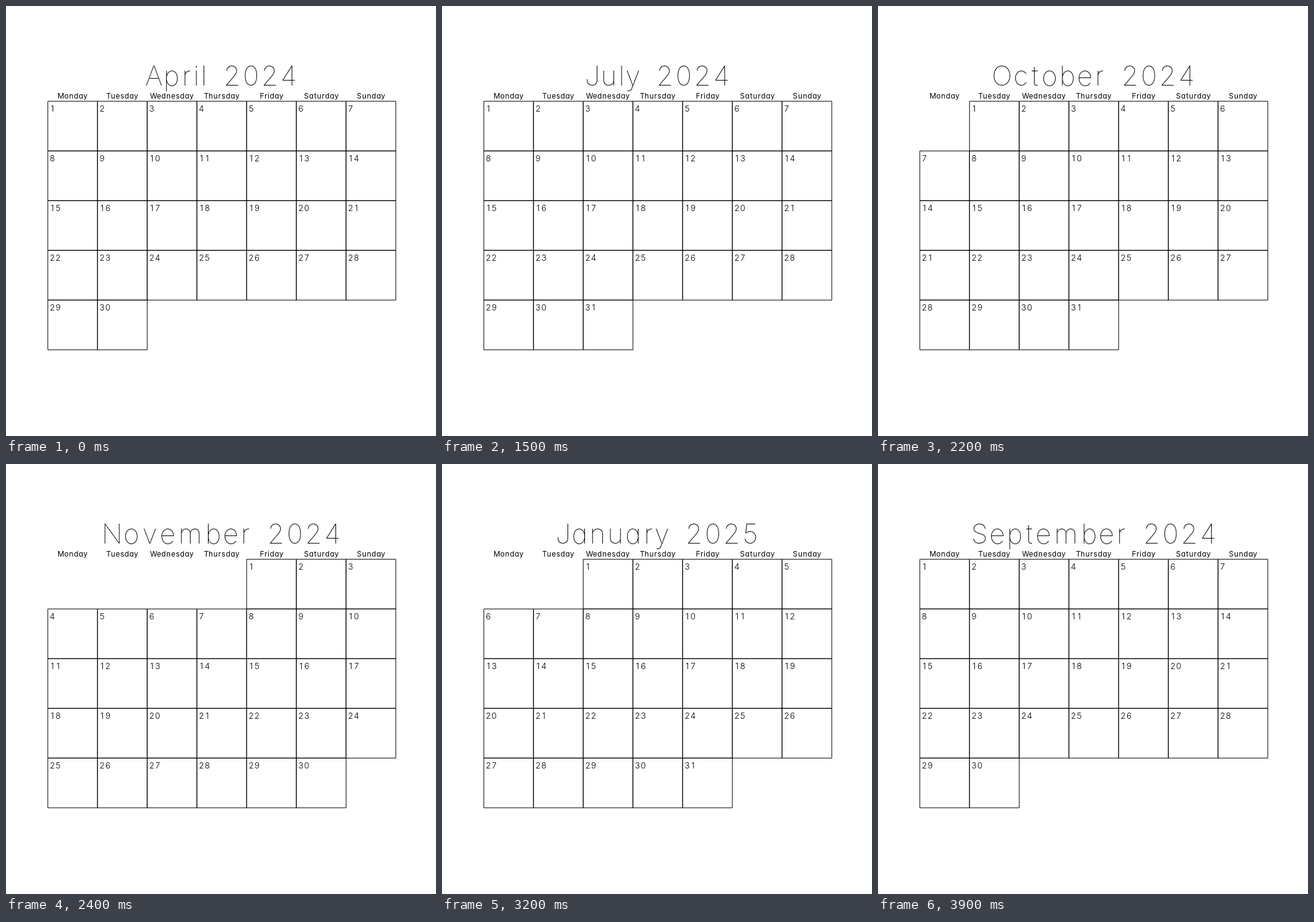
Recreate the animation shown at these times as an HTML page. Size 692 px wide and 692 px high, loop 4 s.

```html
<!DOCTYPE html>
<html lang="en">
<head>
<meta charset="utf-8">
<title>Calendar</title>
<style>
  html, body { margin: 0; width: 100%; height: 100%; overflow: hidden; background: #fff; }
  svg { display: block; width: 692px; height: 692px; }
  text {
    font-family: Inter, Lato, sans-serif; font-feature-settings: "cv11";
    font-optical-sizing: none; text-anchor: middle; fill: #000;
  }
  .title { font-size: 44px; font-weight: 100; }
  .weekday { font-size: 11.8px; }
  .day { font-size: 13.4px; font-weight: 300; }
  path { fill: none; stroke: #000; }
</style>
</head>
<body>
<svg viewBox="0 0 692 692">
  <g id="weekdays"></g>
  <g id="month"></g>
</svg>
<script>
const LEFT = 67.25, TOP = 153.25, CELL = 80, LOOP = 4000;
const WEEKDAYS = ["Monday", "Tuesday", "Wednesday", "Thursday", "Friday", "Saturday", "Sunday"];
// [start in ms, month counted from January 2024]
const STEPS = [
  [0, 3], [900, 4], [1200, 5], [1500, 6], [1800, 7], [2000, 8],
  [2200, 9], [2400, 10], [2600, 11], [2700, 12], [2900, 13],
  [3200, 12], [3400, 11], [3500, 10], [3600, 9], [3800, 8]
];
// Letters grouped by the width of their slot.
const SLOTS = {
  8: "il", 12: "t", 13: "r", 16: "JTy ", 17: "s", 18: "AFce",
  19: "abdhnopu", 20: "S", 22: "NO", 24: "MW", 30: "m"
};

function slot(ch) {
  for (const w in SLOTS) if (SLOTS[w].includes(ch)) return +w;
  return 20;
}

function textWidth(str, scale) {
  return [...str].reduce((sum, ch) => sum + slot(ch) * scale, 0);
}

function add(parent, tag, attrs, content = "") {
  const el = document.createElementNS("http://www.w3.org/2000/svg", tag);
  for (const key in attrs) el.setAttribute(key, attrs[key]);
  el.textContent = content;
  parent.append(el);
}

function addText(parent, cls, str, start, y, scale) {
  let pen = start;
  const x = [...str].map(ch => {
    const w = slot(ch) * scale;
    pen += w;
    return (pen - w / 2).toFixed(2);
  }).join(" ");
  add(parent, "text", { class: cls, x, y }, str);
}

function addCentered(parent, cls, str, mid, y, scale) {
  addText(parent, cls, str, mid - textWidth(str, scale) / 2, y, scale);
}

function drawMonth(month) {
  const group = document.getElementById("month");
  group.replaceChildren();
  const first = new Date(2024, month, 1);
  const days = new Date(2024, month + 1, 0).getDate();
  const name = first.toLocaleString("en-US", { month: "long" });
  // Months that begin on a Sunday start in the first column.
  const offset = Math.max(0, first.getDay() - 1);

  addCentered(group, "title", `${name} ${first.getFullYear()}`, LEFT + 3.5 * CELL, 127.7, 1.515);
  // One path for all cells, so that shared edges are painted once.
  let cells = "";
  for (let day = 1; day <= days; day++) {
    const i = day - 1 + offset;
    const x = LEFT + i % 7 * CELL;
    const y = TOP + Math.floor(i / 7) * CELL;
    cells += `M${x} ${y}h${CELL}v${CELL}h${-CELL}z`;
    addText(group, "day", String(day), x + 2.6, y + 16.5, 0.47);
  }
  add(group, "path", { d: cells });
}

WEEKDAYS.forEach((name, i) =>
  addCentered(document.getElementById("weekdays"), "weekday", name, LEFT + (i + 0.5) * CELL, 149.3, 0.41));

let shown = -1;
function tick() {
  const t = performance.now() % LOOP;
  const month = STEPS.filter(step => step[0] <= t).pop()[1];
  if (month !== shown) drawMonth(shown = month);
  requestAnimationFrame(tick);
}
tick();
</script>
</body>
</html>
```
